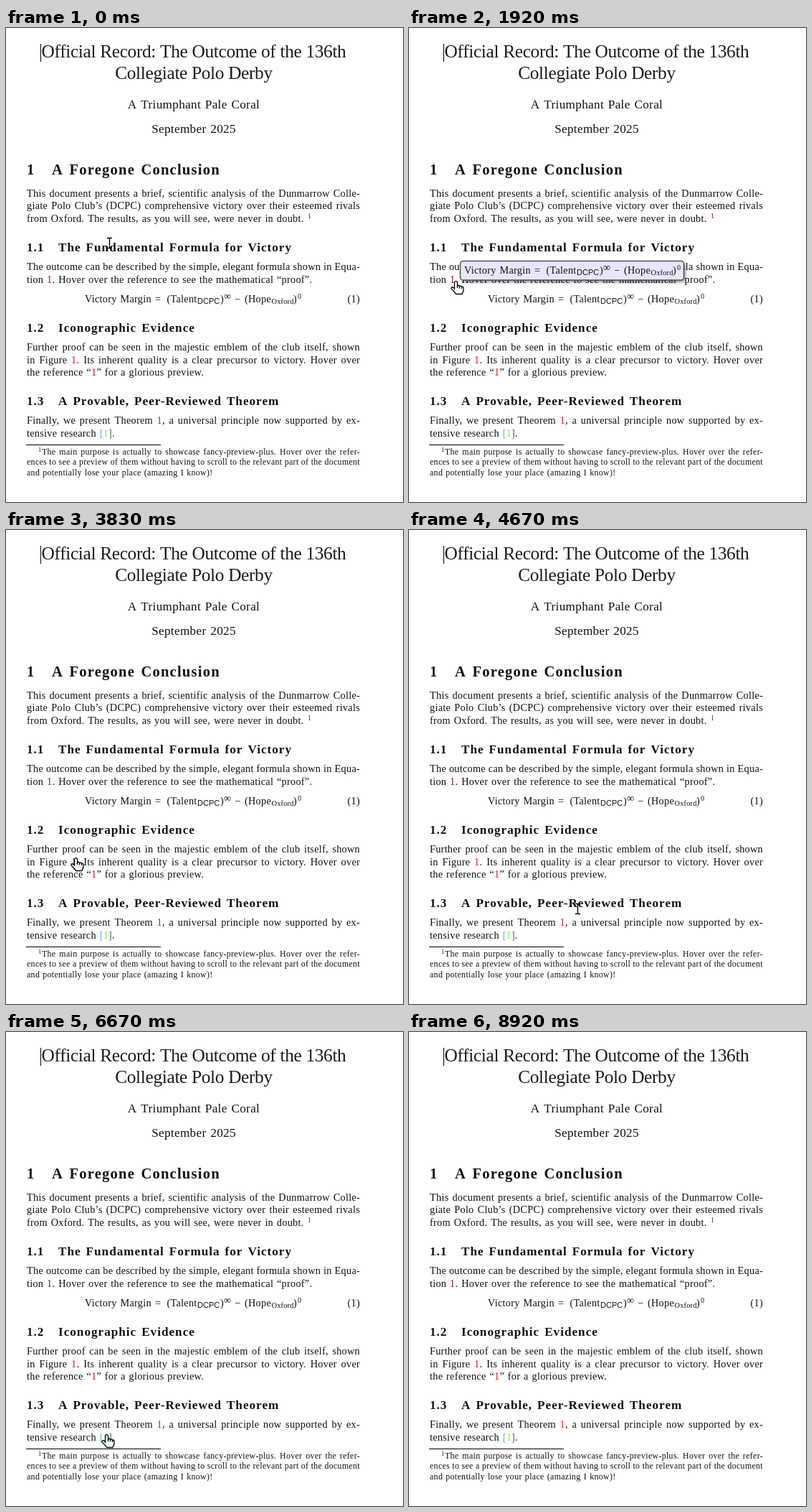
Write an HTML page with a canvas that moves like this. It is 554 px wide and 660 px high and loops after 9 s.

```html
<!DOCTYPE html>
<html lang="en">
<head>
<meta charset="utf-8">
<title>Hover previews</title>
<style>
  html, body { margin: 0; width: 100%; height: 100%; overflow: hidden; background: #fff; }
  canvas { display: block; width: 554px; height: 660px; }
</style>
</head>
<body>
<canvas id="stage"></canvas>
<script>
const W = 554, H = 660, LOOP = 9000, FPS = 12;
const LEFT = 29, MEASURE = 465, CENTER = 262;
const canvas = document.getElementById('stage');
const ctx = canvas.getContext('2d');
const dpr = window.devicePixelRatio || 1;
canvas.width = W * dpr;
canvas.height = H * dpr;

const SERIF = '"Liberation Serif", serif';
const SANS = '"Liberation Sans", sans-serif';

// Letter and word spacing are in em.
const base = { size: 14.3, face: SERIF, look: '', ls: 0.018, ws: 0.07, color: '#111', dy: 0 };
const style = (over) => ({ ...base, ...over });
const BODY = base;
const TITLE = style({ size: 25.4, ls: -0.014, ws: 0, color: '#1c1c1c' });
const AUTHOR = style({ size: 17.2 });
const SECTION = style({ size: 20.6, look: 'bold', ls: 0.058, ws: 0.1 });
const SUBSECTION = style({ size: 17.2, look: 'bold', ls: 0.057, ws: 0.1 });
const NOTE = style({ size: 11.9, ls: 0.028 });
const ITALIC = style({ look: 'italic', ls: 0.03 });
const BOLD = style({ look: 'bold', ls: 0.07 });
const SUB = style({ size: 10.4, dy: 2 });
const SANS_SUB = style({ size: 11, face: SANS, dy: 2, ls: 0 });
const SUP = style({ size: 10.2, dy: -5.5 });
const INFINITY = style({ size: 14.3, dy: -4 });
const tint = (color) => style({ color });

function setStyle(s, word = s.ws * s.size) {
  ctx.font = `${s.look} ${s.size}px ${s.face}`;
  ctx.letterSpacing = s.ls * s.size + 'px';
  ctx.wordSpacing = word + 'px';
  ctx.fillStyle = s.color;
}

function put(text, x, y, s = BODY, align = 'left') {
  setStyle(s);
  const w = ctx.measureText(text).width;
  const shift = align === 'center' ? w / 2 : align === 'right' ? w : 0;
  ctx.fillText(text, x - shift, y + s.dy);
}

// A line of runs, each a plain string or [text, style]; justified if a width is given.
function line(runs, x, y, s = BODY, width = 0) {
  const parts = runs.map((r) => (typeof r === 'string' ? [r, s] : r));
  let gap;
  if (width) {
    let natural = 0, spaces = 0;
    for (const [text, st] of parts) {
      setStyle(st, 0);
      natural += ctx.measureText(text).width;
      spaces += text.split(' ').length - 1;
    }
    gap = (width - natural) / spaces;
  }
  for (const [text, st] of parts) {
    setStyle(st, gap);
    ctx.fillText(text, x, y + st.dy);
    x += ctx.measureText(text).width;
  }
}

const full = (y, ...runs) => line(runs, LEFT, y, BODY, MEASURE);
const open = (y, ...runs) => line(runs, LEFT, y);

function heading(num, text, y) {
  put(num, LEFT, y, SUBSECTION);
  put(text, 73, y, SUBSECTION);
}

function formula(x, y) {
  const pieces = [
    ['Victory Margin', 0], ['=', 98], ['(Talent', 114.5], ['DCPC', 157, SANS_SUB],
    [')', 189], ['∞', 194, INFINITY], ['−', 209], ['(Hope', 223],
    ['Oxford', 260.5, SUB], [')', 291], ['0', 297, SUP]
  ];
  for (const [text, dx, s] of pieces) put(text, x + dx, y, s);
}

function page() {
  ctx.fillStyle = '#fff';
  ctx.fillRect(0, 0, W, H);

  put('Official Record: The Outcome of the 136th', CENTER, 41, TITLE, 'center');
  put('Collegiate Polo Derby', CENTER, 71, TITLE, 'center');
  put('A Triumphant Pale Coral', CENTER, 112, AUTHOR, 'center');
  put('September 2025', CENTER, 146, AUTHOR, 'center');
  ctx.fillStyle = '#000';
  ctx.fillRect(48, 22, 1, 25);

  put('1', LEFT, 204, SECTION);
  put('A Foregone Conclusion', 64, 204, SECTION);
  full(235, 'This document presents a brief, scientific analysis of the Dunmarrow Colle-');
  full(252, 'giate Polo Club’s (DCPC) comprehensive victory over their esteemed rivals');
  open(270, 'from Oxford. The results, as you will see, were never in doubt.');
  put('1', 421, 270, style({ size: 10, dy: -5, color: '#802020' }));

  heading('1.1', 'The Fundamental Formula for Victory', 311);
  full(337, 'The outcome can be described by the simple, elegant formula shown in Equa-');
  open(355, 'tion ', ['1', tint('#8a1818')], '. Hover over the reference to see the mathematical “proof”.');
  formula(110, 382);
  put('(1)', 494, 382, BODY, 'right');

  heading('1.2', 'Iconographic Evidence', 423);
  full(449, 'Further proof can be seen in the majestic emblem of the club itself, shown');
  full(467, 'in Figure ', ['1', tint('#e8103c')], '. Its inherent quality is a clear precursor to victory. Hover over');
  open(484, 'the reference “', ['1', tint('#e81010')], '” for a glorious preview.');

  heading('1.3', 'A Provable, Peer-Reviewed Theorem', 525);
  full(551, 'Finally, we present Theorem ', ['1', tint('#d02020')], ', a universal principle now supported by ex-');
  open(569, 'tensive research ', ['[', tint('#58b4d8')], ['1', tint('#8cf03c')], [']', tint('#356a70')], '.');

  ctx.fillStyle = '#000';
  ctx.fillRect(28, 580, 188, 1);
  put('1', 45, 594, style({ size: 8.5, dy: -4 }));
  line(['The main purpose is actually to showcase fancy-preview-plus. Hover over the refer-'], 50, 594, NOTE, 444);
  line(['ences to see a preview of them without having to scroll to the relevant part of the document'], LEFT, 608, NOTE, MEASURE);
  line(['and potentially lose your place (amazing I know)!'], LEFT, 623, NOTE);
}

function bubble(x, y, w, h) {
  ctx.save();
  ctx.beginPath();
  ctx.roundRect(x, y, w, h, 4);
  ctx.shadowColor = 'rgba(0,0,0,0.5)';
  ctx.shadowBlur = 4 * dpr;
  ctx.shadowOffsetX = 2 * dpr;
  ctx.shadowOffsetY = 2.5 * dpr;
  ctx.fillStyle = '#e8e6fe';
  ctx.fill();
  ctx.restore();
  ctx.lineWidth = 1.5;
  ctx.strokeStyle = '#55555c';
  ctx.stroke();
}

function equationPreview() {
  bubble(71.5, 324.5, 312, 26.5);
  formula(77, 342);
}

function theoremPreview() {
  bubble(-96, 491.5, 476, 57);
  const row = (y, ...runs) => line(runs, -90, y, ITALIC, MEASURE);
  row(507.5, ['Theorem 1', BOLD], [' (The Principle of Pale Coral Supremacy). ', BODY], 'In any given Colle-');
  row(524.5, 'giate Polo Derby, the probability of a DCPC victory, P(V',
    ['DCPC', style({ size: 10, look: 'italic', face: SANS, dy: 2, ls: 0 })], '), asymptoti-');
  row(541.5, 'cally approaches 1. For the 136th match, this theorem was rigorously proven.');
}

// Pointer stops: time, x, y.
const STOPS = [
  [0, 144, 299], [1000, 65, 352], [2400, 65, 352], [3100, 97, 456], [3850, 97, 456],
  [4667, 235, 527], [5250, 218, 549], [6150, 218, 549], [6600, 140, 560],
  [7000, 140, 560], [7417, 197, 567], [8300, 197, 567]
];
const HOVERS = [[920, 2480], [3050, 3950], [5170, 6230], [6550, 7080]];
const within = (t, [a, b]) => t >= a && t < b;

function pointerAt(t) {
  const i = STOPS.findIndex((s) => s[0] > t);
  if (i < 0) return null;
  const [t0, x0, y0] = STOPS[i - 1], [t1, x1, y1] = STOPS[i];
  const p = (t - t0) / (t1 - t0), e = p * p * (3 - 2 * p);
  return [Math.round(x0 + (x1 - x0) * e), Math.round(y0 + (y1 - y0) * e)];
}

const HAND = new Path2D('M-2 1.5Q0-1.2 2 1.5V6.5Q4 4.8 5 7Q7 5.6 8 8Q10 7 10.5 9.5V12.5' +
  'Q10 15 8.5 18H0Q-2 14.5-6 11Q-7.5 8.5-5 8.2Q-3.5 8.5-2 10.5Z');
const KNUCKLES = new Path2D('M2 6.5V9.5M5 7V10M8 8V10.5');
const BEAM = new Path2D('M-3.5-7H-1Q0-7 0-6Q0-7 1-7H3.5M0-6V6M-3.5 7H-1Q0 7 0 6Q0 7 1 7H3.5');

function pointer(t) {
  const at = pointerAt(t);
  if (!at) return;
  ctx.save();
  ctx.translate(at[0] + 0.5, at[1] + 0.5);
  ctx.strokeStyle = '#000';
  ctx.lineWidth = 1.3;
  if (HOVERS.some((h) => within(t, h))) {
    ctx.fillStyle = '#fff';
    ctx.fill(HAND);
    ctx.stroke(HAND);
    ctx.stroke(KNUCKLES);
  } else {
    ctx.stroke(BEAM);
  }
  ctx.restore();
}

function draw(now) {
  const step = Math.floor(((now % LOOP) / 1000) * FPS + 0.05);
  const t = (step * 1000 / FPS) % LOOP;
  ctx.setTransform(dpr, 0, 0, dpr, 0, 0);
  page();
  if (within(t, [1080, 2480])) equationPreview();
  if (within(t, [5330, 6230])) theoremPreview();
  pointer(t);
}

const start = performance.now();
function tick() {
  draw(performance.now() - start);
  requestAnimationFrame(tick);
}
tick();
</script>
</body>
</html>
```
